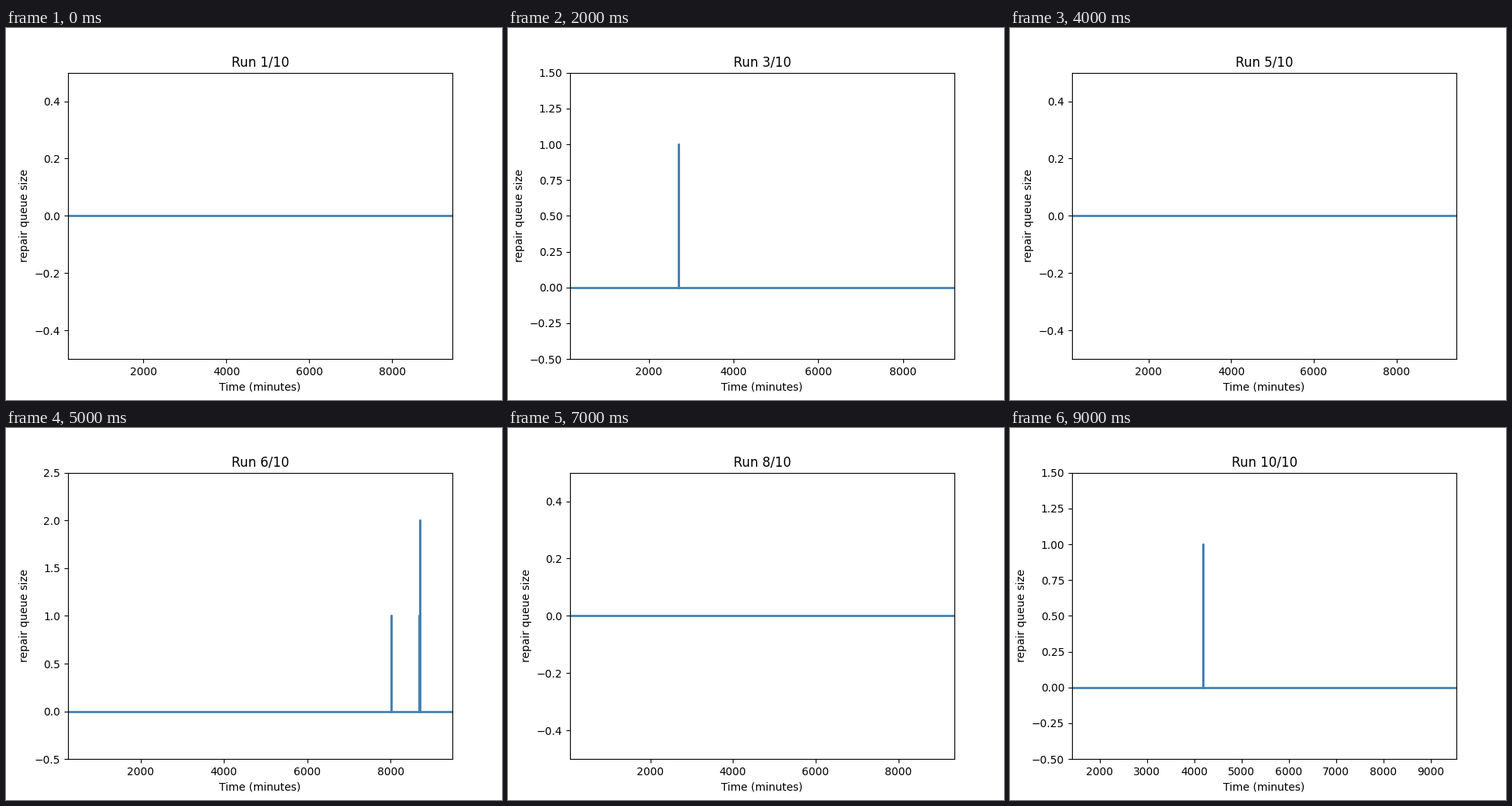
Recreate the animation shown at these times as a matplotlib script. Size 640 px wide and 480 px high, loop 10 s.

```python
import matplotlib.pyplot as plt
from matplotlib.animation import FuncAnimation

# First and last logged minute of each run
SPANS = [(178, 9449), (67, 9589), (144, 9209), (591, 9409), (150, 9450),
         (263, 9477), (440, 9397), (59, 9359), (719, 9421), (1418, 9549)]

# Moments when the queue briefly fills, by run: {minute: size}
PULSES = {
    2: {1525: 1, 1566: 2, 1625: 1},
    3: {2700: 1},
    6: {8010: 1, 8679: 1, 8697: 2},
    7: {5220: 2},
    9: {6120: 1},
    10: {4194: 1},
}

fig, ax = plt.subplots(figsize=(6.4, 4.8), dpi=100)


def queue_trace(start, end, pulses):
    """An empty queue with an instant rise and fall at every pulse."""
    points = [(start, 0)]
    for minute, size in pulses.items():
        points += [(minute, 0), (minute, size), (minute, 0)]
    return zip(*points, (end, 0))


def draw(i):
    run = i + 1
    span = SPANS[i]
    minutes, sizes = queue_trace(*span, PULSES.get(run, {}))
    ax.clear()
    ax.plot(minutes, sizes, color="steelblue", linewidth=2)
    ax.set_xlim(span)
    ax.set_ylim(-0.5, max(sizes) + 0.5)
    ax.set_title(f"Run {run}/{len(SPANS)}")
    ax.set_xlabel("Time (minutes)")
    ax.set_ylabel("repair queue size")
    return []


anim = FuncAnimation(fig, draw, frames=len(SPANS), interval=1000,
                     repeat=True, repeat_delay=0, blit=False)
plt.show()
```
